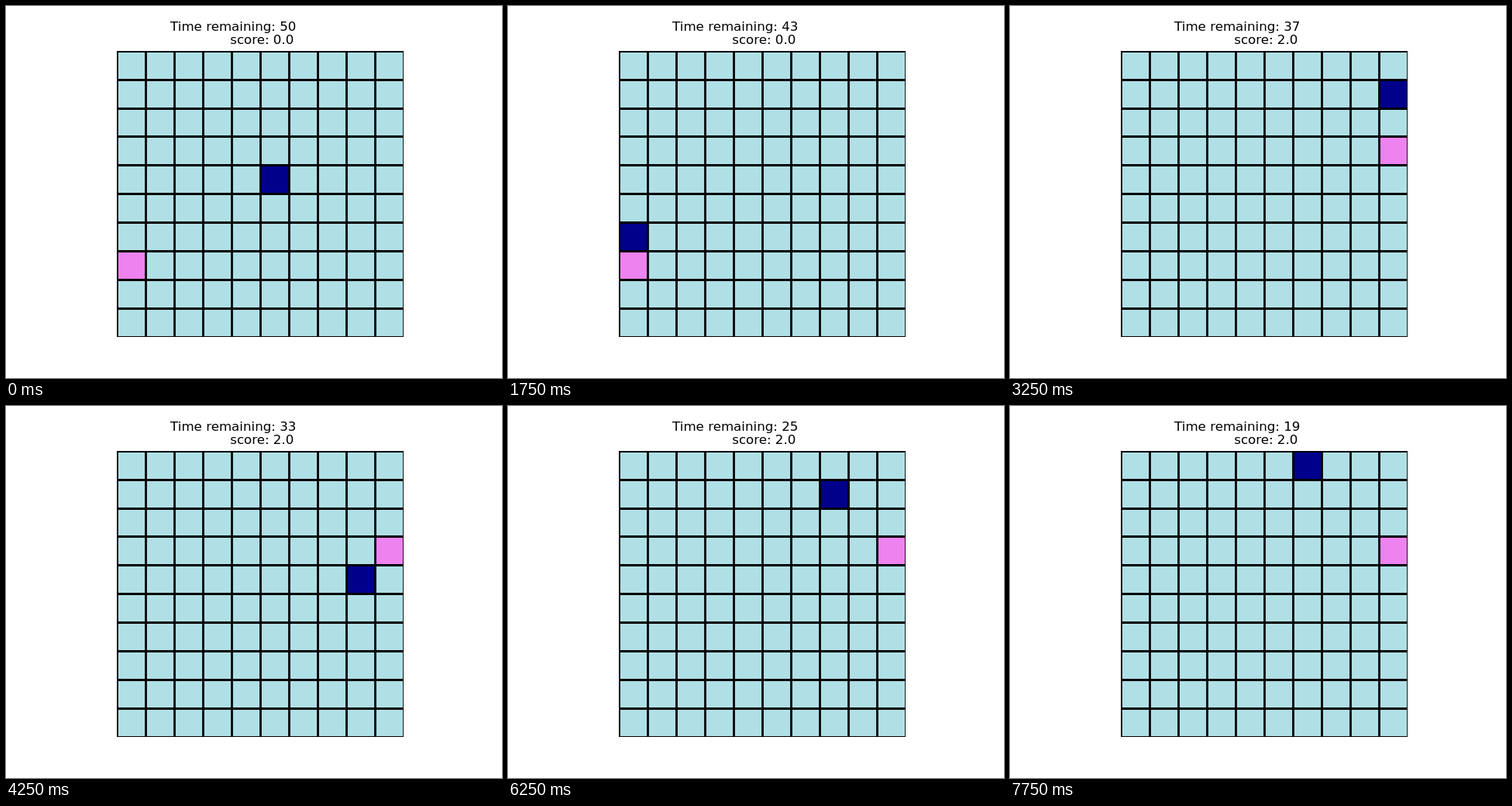
An HTML page with a canvas for the animation above (8000 ms loop, 640 by 480 pixels).

```html
<!DOCTYPE html>
<html lang="en">
<head>
<meta charset="utf-8">
<title>Grid chase</title>
<style>
  html, body { margin: 0; width: 100%; height: 100%; overflow: hidden; background: #fff; }
  canvas { display: block; }
</style>
</head>
<body>
<canvas id="stage" width="640" height="480"></canvas>
<script>
const ctx = document.getElementById('stage').getContext('2d');

const LOOP = 8000, STEP = 250;
const SIZE = 10, CELL = 36.96, LEFT = 143.2, TOP = 57.6;
const MOVES = 'DDLLLLLDDDDDLLDDDDDDLDDDDLUDUDU';
const DIRECTIONS = { L: [-1, 0], D: [0, 1], U: [0, -1] };
const EAT_STEP = 8;

const wrap = n => (n + SIZE) % SIZE;
const edgeX = col => Math.round(LEFT + col * CELL);
const edgeY = row => Math.round(TOP + row * CELL);

// Player cell after each step; the board wraps around.
const path = [[5, 4]];
for (const move of MOVES) {
  const [col, row] = path[path.length - 1];
  const [dx, dy] = DIRECTIONS[move];
  path.push([wrap(col + dx), wrap(row + dy)]);
}

function fillCell([col, row], color) {
  const x = edgeX(col), y = edgeY(row);
  ctx.fillStyle = color;
  ctx.fillRect(x, y, edgeX(col + 1) - x, edgeY(row + 1) - y);
}

function drawGrid() {
  ctx.strokeStyle = '#000';
  ctx.lineWidth = 2.78;
  ctx.beginPath();
  for (let i = 0; i <= SIZE; i++) {
    const x = edgeX(i) + 0.5, y = edgeY(i) + 0.5;
    ctx.moveTo(x, 0);
    ctx.lineTo(x, 480);
    ctx.moveTo(0, y);
    ctx.lineTo(640, y);
  }
  ctx.stroke();
}

function draw(step) {
  const eaten = step >= EAT_STEP;
  ctx.fillStyle = '#fff';
  ctx.fillRect(0, 0, 640, 480);

  ctx.save();
  ctx.beginPath();
  ctx.rect(143, 58, 370, 369);
  ctx.clip();
  ctx.fillStyle = '#b0e0e6';
  ctx.fillRect(143, 58, 370, 369);
  fillCell(eaten ? [9, 3] : [0, 7], '#ee82ee');
  fillCell(path[step], '#00008b');
  drawGrid();
  ctx.restore();

  ctx.fillStyle = '#000';
  ctx.font = '16.667px "DejaVu Sans", sans-serif';
  ctx.fillText(`Time remaining: ${50 - step}`, 212.1, 32);
  ctx.fillText(`score: ${eaten ? '2.0' : '0.0'}`, 289.2, 49);
}

function tick() {
  draw(Math.floor(performance.now() % LOOP / STEP));
  requestAnimationFrame(tick);
}
tick();
</script>
</body>
</html>
```
